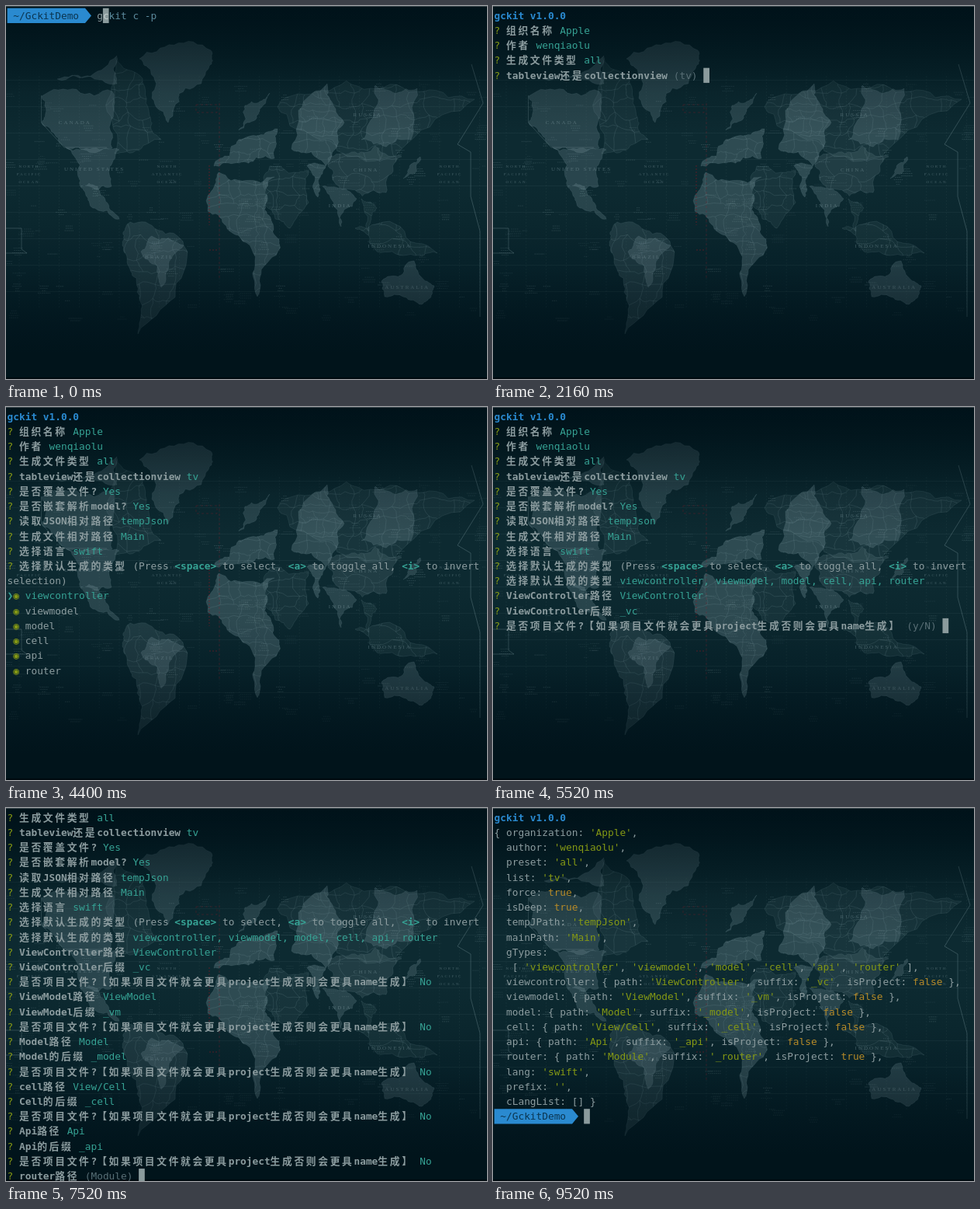
Animation, 620 px wide and 480 px high, one loop 9.6 s. Source, as an HTML page with a canvas:

```html
<!DOCTYPE html>
<html lang="zh">
<head>
<meta charset="utf-8">
<title>gckit</title>
<style>
html, body { margin: 0; width: 100%; height: 100%; overflow: hidden; background: #01121a; }
canvas { display: block; }
</style>
</head>
<body>
<canvas id="stage" width="620" height="480"></canvas>
<script>
const W = 620, H = 480, LOOP = 9600;
const CELL = 7.705, ROW = 19.22, LEFT = 1.6, TOP = 2.8, ROWS = 25;
const TEXT = '#8c9c9f', DIM = '#586e75', GREEN = '#859914', CYAN = '#36a294',
      BLUE = '#2a8ad0', AMBER = '#b58a28';
const ctx = document.getElementById('stage').getContext('2d');

// ---- World map wallpaper ----
// Key corners only; coasts and borders are roughened by seeded midpoint displacement.
const LANDS = [
  { tone: .09, cell: 19, shapes: {
    quebec: '143 66 184 135 200 172 140 190',
    arabia: '340 206 390 212 366 286 334 256',
    RUSSIA: '350 130 470 106 604 120 440 194',
    indochina: '458 248 478 260 468 290',
    INDONESIA: '450 286 556 318 478 316' } },
  { tone: .16, cell: 21, shapes: {
    andes: '160 278 229 308 170 422 168 350 150 308',
    CHINA: '415 196 476 180 510 194 490 240 430 234' } },
  { tone: .23, shapes: {
    arctic: '66 94 143 64 143 100',
    CANADA: '46 116 137 110 137 183 78 183 46 150',
    'UNITED STATES': '78 183 146 185 136 232 96 232',
    mexico: '96 232 118 232 146 274 112 260',
    greenland: '172 68 264 57 256 90 209 150 192 96',
    BRAZIL: '188 296 229 308 200 362 174 316',
    scandinavia: '300 160 308 128 340 112 322 146',
    siberia: '476 102 530 106 522 172 458 172',
    INDIA: '408 232 452 248 432 284',
    japan: '512 222 534 194 528 214',
    AUSTRALIA: '484 354 526 328 552 360 536 384 488 374' } },
  { tone: .28, cell: 15, shapes: {
    africa: '274 214 346 220 334 256 352 300 324 374 302 298 260 264',
    europe: '268 206 300 172 350 158 346 196 300 202',
    kazakhstan: '414 100 436 150 412 206 368 184',
    iran: '388 206 412 206 402 246' } }
];

function paintMap() {
  const canvas = document.createElement('canvas');
  canvas.width = W;
  canvas.height = H;
  const g = canvas.getContext('2d');
  let seed = 7;
  const rnd = () => (seed = seed * 16807 % 2147483647) / 2147483647;
  const ink = a => `rgba(135,162,168,${a})`;
  const shade = a => `rgba(0,18,25,${a})`;
  const fade = colours => { // evenly spaced stops
    const grad = g.createLinearGradient(0, 0, 0, 445);
    colours.forEach((c, i) => grad.addColorStop(i / (colours.length - 1), c));
    g.fillStyle = grad;
    g.fillRect(0, 0, W, 445);
  };
  const line = (d, colour, dash = []) => {
    g.strokeStyle = colour;
    g.setLineDash(dash);
    g.stroke(new Path2D(d));
  };
  const rough = (pts, rounds, closed) => {
    for (; rounds > 0; rounds--) pts = pts.flatMap(([x, y], i) => {
      const next = pts[i + 1] || (closed && pts[0]);
      if (!next) return [[x, y]];
      const dx = next[0] - x, dy = next[1] - y, k = (rnd() - .5) * .36;
      return [[x, y], [x + dx / 2 - dy * k, y + dy / 2 + dx * k]];
    });
    return 'M' + pts.join('L') + (closed ? 'Z' : '');
  };
  const borders = (pts, size) => {
    const jitter = n => n + (rnd() - .5) * size * .7;
    const [x0, x1, y0, y1] = [0, 1].flatMap(axis => {
      const values = pts.map(p => p[axis]);
      return [Math.min(...values) - size, Math.max(...values) + size];
    });
    let above = [];
    for (let y = y0; y < y1; y += size) {
      const nodes = [];
      for (let x = x0; x < x1; x += size) nodes.push([jitter(x), jitter(y)]);
      line(rough(nodes, 2), ink(.24));
      above.forEach((p, i) => rnd() < .8 && line(rough([p, nodes[i]], 2), ink(.24)));
      above = nodes;
    }
  };

  g.fillStyle = '#01141b';
  g.fillRect(0, 0, W, H);
  fade(['#00131b', '#051d24', '#0b272e', '#0d2a31', '#0d2a31', '#0b272e', '#08232b', '#041c24', '#02161e']);
  g.lineWidth = 1;
  for (let y = 95; y < 380; y += 34) line(`M0 ${y}.5H620`, ink(.07));
  for (let x = 17; x < W; x += 25.8) line(`M${x} 90V390`, ink(.08), [2, 2]);

  g.textAlign = 'center';
  g.letterSpacing = '2px';
  const label = (word, x, y, size) => {
    g.font = `${size}px "Liberation Serif", serif`;
    g.fillStyle = ink(.45);
    g.fillText(word, x, y);
  };
  g.lineWidth = .7;
  for (const { tone, cell, shapes } of LANDS) {
    for (const [name, corners] of Object.entries(shapes)) {
      const pts = corners.match(/\d+ \d+/g).map(p => p.split(' ').map(Number));
      const coast = rough(pts, 4, true);
      g.fillStyle = ink(tone);
      g.fill(new Path2D(coast));
      line(coast, ink(.2));
      if (cell) {
        g.save();
        g.clip(new Path2D(coast));
        borders(pts, cell);
        g.restore();
      }
      const middle = axis => pts.reduce((sum, p) => sum + p[axis], 0) / pts.length;
      if (name === name.toUpperCase()) label(name, middle(0), middle(1) + 4, 7);
    }
  }
  ['PACIFIC', 'ATLANTIC', 'PACIFIC'].forEach((sea, i) =>
    ['NORTH', sea, 'OCEAN'].forEach((word, k) => label(word, 30 + i * 271 - i % 2 * 93, 208 + k * 10, 5)));

  // Unreadable place names: small stacks of dashes
  g.lineWidth = 1;
  for (let i = 0; i < 150; i++) {
    const x = rnd() * W, y = 90 + rnd() * 310, a = .1 + rnd() * .17;
    for (let k = rnd() * 4; k > 0; k--) {
      const half = 2 + rnd() * 7;
      line(`M${x - half} ${y + 3 * Math.ceil(k)}h${half * 2}`, ink(a), [1.5, 1]);
    }
  }
  line('M600 75L615 125 582 178 599 188V245L611 290V400', ink(.32));
  line('M0 286H20V313L27 318H0', ink(.3));
  line('M45.5 115V150L75 182H130', ink(.25));
  line('M275 125V350M245 127H272V137H245Z', 'rgba(140,25,35,.35)', [3, 3]);
  line('M262 205V282M262 314H274', 'rgba(150,25,35,.55)', [2, 2]);

  fade([.7, .38, .12, 0, 0, 0, .1, .3, .5].map(shade));
  g.fillStyle = '#3b484d';
  g.fillRect(0, 0, W, 1);
  g.fillStyle = '#000a0f';
  g.fillRect(0, 478, W, 2);
  return canvas;
}
const map = paintMap();

// ---- Terminal session ----
const COMMAND = 'gckit c -p', PROMPT_COLS = 15;
const PROJECT = '是否项目文件?【如果项目文件就会更具project生成否则会更具name生成】';
const TYPES = '选择默认生成的类型';
const KINDS = 'viewcontroller, viewmodel, model, cell, api, router';
const START = 880, DONE = 7800, TYPE_AGAIN = 8240, PRINT = 9440;
const STEPS = [
  ['组织名称', 'Apple'], ['作者', 'wenqiaolu'], ['生成文件类型', 'all'],
  ['tableview还是collectionview', 'tv'], ['是否覆盖文件?', 'Yes'], ['是否嵌套解析model?', 'Yes'],
  ['读取JSON相对路径', 'tempJson'], ['生成文件相对路径', 'Main'], ['选择语言', 'swift'], [TYPES, KINDS],
  ['ViewController路径', 'ViewController'], ['ViewController后缀', '_vc'], [PROJECT, 'No'],
  ['ViewModel路径', 'ViewModel'], ['ViewModel后缀', '_vm'], [PROJECT, 'No'],
  ['Model路径', 'Model'], ['Model的后缀', '_model'], [PROJECT, 'No'],
  ['cell路径', 'View/Cell'], ['Cell的后缀', '_cell'], [PROJECT, 'No'],
  ['Api路径', 'Api'], ['Api的后缀', '_api'], [PROJECT, 'No'],
  ['router路径', 'Module'], ['Api的后缀', '_router'], [PROJECT, 'Yes']
];
// Answering pace: [step, time], even in between
const PACE = [[0, 1280], [7, 3600], [9, 4720], [12, 5680], [20, 7040], [27, DONE]];
function answerTime(step) {
  const k = Math.max(1, PACE.findIndex(([s]) => s >= step));
  const [[s0, t0], [s1, t1]] = [PACE[k - 1], PACE[k]];
  return t0 + (t1 - t0) * (step - s0) / (s1 - s0);
}
const CONFIG = `{ organization: 'Apple',
  author: 'wenqiaolu',
  preset: 'all',
  list: 'tv',
  force: true,
  isDeep: true,
  tempJPath: 'tempJson',
  mainPath: 'Main',
  gTypes:
   [ 'viewcontroller', 'viewmodel', 'model', 'cell', 'api', 'router' ],
  viewcontroller: { path: 'ViewController', suffix: '_vc', isProject: false },
  viewmodel: { path: 'ViewModel', suffix: '_vm', isProject: false },
  model: { path: 'Model', suffix: '_model', isProject: false },
  cell: { path: 'View/Cell', suffix: '_cell', isProject: false },
  api: { path: 'Api', suffix: '_api', isProject: false },
  router: { path: 'Module', suffix: '_router', isProject: true },
  lang: 'swift',
  prefix: '',
  cLangList: [] }`.split('\n');

// A row holds spans of [text, colour, bold] and optional flags.
const row = (spans, flags) => ({ spans, ...flags });
const HEADER = row([['gckit v1.0.0', BLUE, true]]);
const ask = (question, ...rest) => [['? ', GREEN], [question + ' ', TEXT, true], ...rest];
const HELP = row(ask(TYPES, ...'(Press |<space>| to select, |<a>| to toggle all, |<i>| to invert'.split('|')
  .map((s, i) => i % 2 ? [s, CYAN, true] : [s, TEXT])));

const promptRow = typed => row(
  typed ? [[COMMAND.slice(0, typed), TEXT], [COMMAND.slice(typed), '#5b8a9c']] : [],
  { prompt: true, cursor: PROMPT_COLS + typed });

function configRow(text) {
  return row(text.split(/('[^']*'|true|false)/).map(s =>
    [s, s[0] === "'" ? GREEN : /^(true|false)$/.test(s) ? AMBER : TEXT]));
}

function pendingRows(question, answer) {
  if (question === TYPES) return [
    row([['selection)', TEXT]]),
    ...KINDS.split(', ').map((kind, i) =>
      row([[i ? ' ' : '❯', CYAN], ['◉ ', GREEN], [kind, i ? TEXT : CYAN]]))];
  const hint = /^(Yes|No)$/.test(answer) ? (question === PROJECT ? 'y/N' : 'Y/n') : answer;
  return [row(ask(question, [`(${hint}) `, DIM]), { cursor: 'end' })];
}

function questionRows(t) {
  const answered = STEPS.filter((_, i) => t >= answerTime(i)).length;
  return STEPS.slice(0, answered + 1).flatMap(([question, answer], i) => [
    ...(question === TYPES ? [HELP] : []),
    ...(i < answered ? [row(ask(question, [answer, CYAN]))] : pendingRows(question, answer))]);
}

function screen(t) {
  const typed = (start, max) => Math.max(0, Math.min(max, Math.floor((t - start) / 100) + 1));
  if (t < START) return [promptRow(typed(0, 7))];
  if (t >= PRINT) return [HEADER, ...CONFIG.map(configRow), promptRow(0)];
  const rows = [HEADER, ...questionRows(t)];
  if (t >= DONE) rows.push(
    row([['   配置成功...', '#72878a']], { popper: true }),
    promptRow(typed(TYPE_AGAIN, COMMAND.length)));
  return rows;
}

// ---- Drawing ----
function drawPrompt(y) {
  ctx.fillStyle = BLUE;
  ctx.fill(new Path2D(`M${LEFT} ${y}H102L110 ${y + ROW / 2} 102 ${y + ROW}H${LEFT}Z`));
  drawText([['~/GckitDemo', '#0b3550']], y, 1);
}

function drawPopper(y) {
  ctx.fillStyle = '#d9a63a';
  ctx.fill(new Path2D(`M2 ${y + 17}L6 ${y + 6} 13 ${y + 13}Z`));
  ['#d65a4a', '#e8d9a0', '#4d9ad0', '#e0b040', '#c96a90'].forEach((colour, i) => {
    ctx.fillStyle = colour;
    ctx.fillRect(7 + i * 2, y + 2 + i * 4 % 9, 2, 2);
  });
}

function drawText(spans, y, col) {
  for (const [text, colour, bold] of spans) {
    ctx.fillStyle = colour;
    for (const ch of text) {
      const wide = ch > '\u2e80';
      ctx.font = (bold ? 'bold ' : '') + (wide
        ? '12.8px "Noto Sans CJK SC", "Noto Sans CJK", sans-serif'
        : '12.8px "DejaVu Sans Mono", monospace');
      ctx.fillText(ch, LEFT + col * CELL, y + 14);
      col += wide ? 2 : 1;
    }
  }
  return col;
}

function drawRow({ spans, prompt, popper, cursor }, index) {
  const y = TOP + index * ROW;
  if (prompt) drawPrompt(y);
  if (popper) drawPopper(y);
  const end = drawText(spans, y, prompt ? PROMPT_COLS : 0);
  if (cursor === undefined) return;
  const col = cursor === 'end' ? end : cursor;
  ctx.fillStyle = '#8b9b9d';
  ctx.fillRect(LEFT + col * CELL, y, CELL, ROW);
  if (prompt && end > col) drawText([[COMMAND[col - PROMPT_COLS], '#c6d0d0']], y, col);
}

function frame() {
  ctx.drawImage(map, 0, 0);
  screen(performance.now() % LOOP).slice(-ROWS).forEach(drawRow);
  requestAnimationFrame(frame);
}
frame();
</script>
</body>
</html>
```
